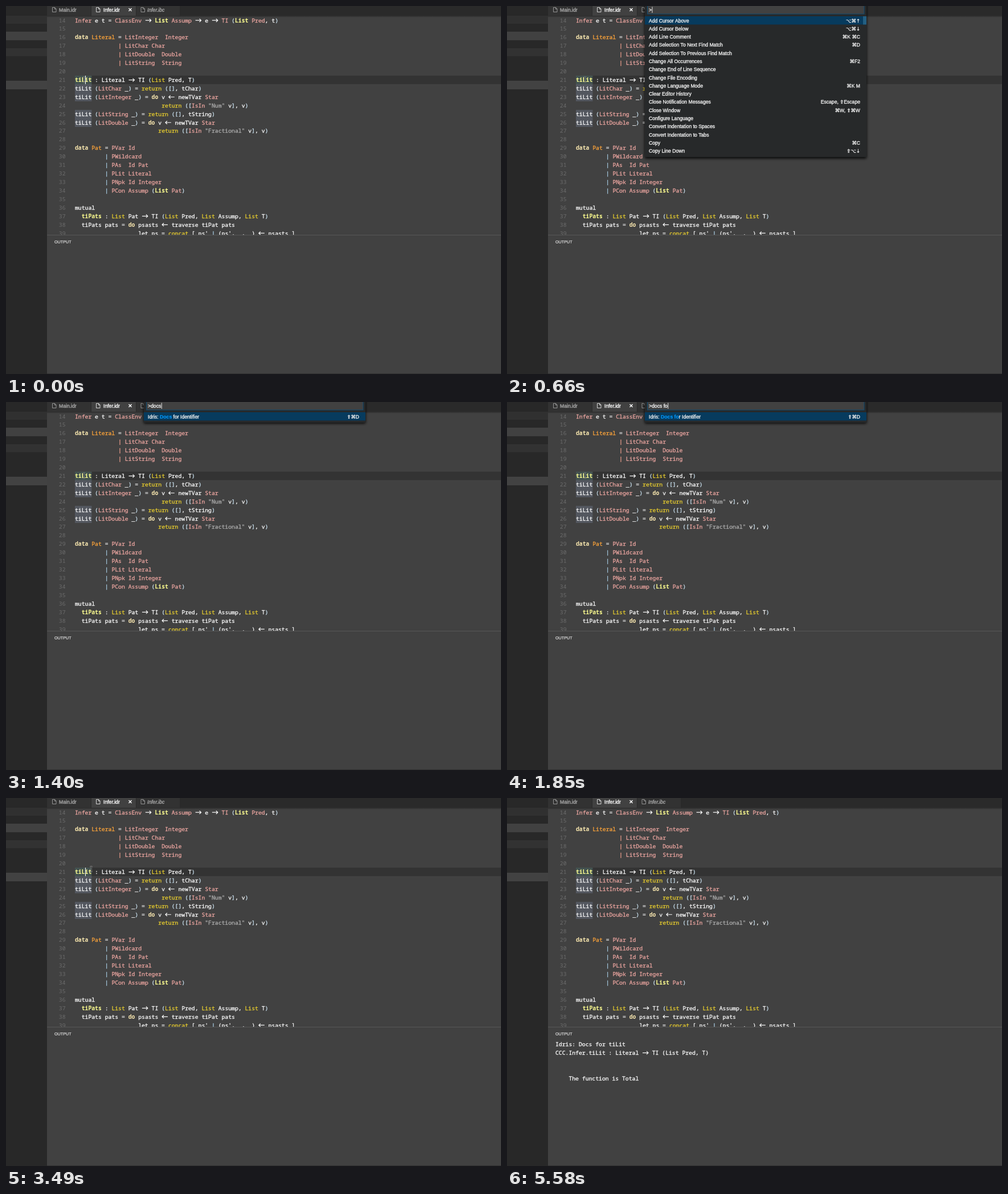
Write an HTML page with a canvas that moves like this. It is 869x645 px and loops after 5.72 s.

```html
<!DOCTYPE html>
<html lang="en">
<head>
<meta charset="utf-8">
<title>Editor: docs for identifier</title>
<style>
html, body { margin: 0; width: 100%; height: 100%; overflow: hidden; background: #414141; }
canvas { display: block; }
</style>
</head>
<body>
<canvas id="stage" width="869" height="645"></canvas>
<script>
const ctx = document.getElementById('stage').getContext('2d');
const LOOP = 5720;
const CELL = 5.853, LINE = 14.92, ROW = 14.28;
const MONO = '9.755px "Noto Sans Mono", "DejaVu Sans Mono", monospace';
const SANS = '"Liberation Sans", "DejaVu Sans", Arial, sans-serif';
const UI = '8.63px ' + SANS;
const SYMBOL = '8.4px "DejaVu Sans", sans-serif';

// "~x" switches to colour x
const INK = {
  w: '#f6f6f6', p: '#e6a29d', b: '#c6dcea', y: '#e3c92f',
  Y: '#ffff90', k: '#fbe9b0', o: '#f7a13a', s: '#a9a9a9', c: '#b0d6ee', r: '#f0a08c'
};
const BOLD = 'Yk';

const CODE = [
  '~pInfer ~we t = ~pClassEnv~w -> ~YList~p Assump~w -> e -> ~pTI ~b(~YList~p Pred~w, t~b)',
  '',
  '~kdata~o Literal~w = ~pLitInteger  Integer',
  '             ~r| ~pLitChar Char',
  '             ~r| ~pLitDouble  Double',
  '             ~r| ~pLitString  String',
  '',
  '~YtiLit~w : Literal -> TI ~b(~yList~w Pred, T~b)',
  'tiLit ~b(~pLitChar ~w_~b)~w = ~yreturn ~b([]~w, tChar~b)',
  'tiLit ~b(~pLitInteger ~w_~b)~w = ~kdo~w v <- newTVar ~pStar',
  '                          ~yreturn ~b([~pIsIn ~s"Num"~w v~b]~w, v~b)',
  'tiLit ~b(~pLitString ~w_~b)~w = ~yreturn ~b([]~w, tString~b)',
  'tiLit ~b(~pLitDouble ~w_~b)~w = ~kdo~w v <- newTVar ~pStar',
  '                         ~yreturn ~b([~pIsIn ~s"Fractional"~w v~b]~w, v~b)',
  '',
  '~kdata~o Pat~w = ~pPVar Id',
  '         ~c| ~pPWildcard',
  '         ~c| ~pPAs  Id Pat',
  '         ~c| ~pPLit Literal',
  '         ~c| ~pPNpk Id Integer',
  '         ~c| ~pPCon Assump ~b(~YList~p Pat~b)',
  '',
  'mutual',
  '  ~YtiPats~w : ~yList~w Pat -> TI ~b(~yList~w Pred, ~yList~w Assump, ~yList~w T~b)',
  '  tiPats pats = ~kdo~w psasts <- traverse tiPat pats',
  "                   let ps = ~yconcat~w [ ps' ~c|~w (ps', _, _) <- psasts ]"
];

// rows: label|shortcut, "*" toggles the match highlight
const ALL = [
  'Add Cursor Above|⌥⌘↑', 'Add Cursor Below|⌥⌘↓', 'Add Line Comment|⌘K ⌘C',
  'Add Selection To Next Find Match|⌘D', 'Add Selection To Previous Find Match',
  'Change All Occurrences|⌘F2', 'Change End of Line Sequence', 'Change File Encoding',
  'Change Language Mode|⌘K M', 'Clear Editor History',
  'Close Notification Messages|Escape, ⇧Escape', 'Close Window|⌘W, ⇧⌘W',
  'Configure Language', 'Convert Indentation to Spaces', 'Convert Indentation to Tabs',
  'Copy|⌘C', 'Copy Line Down|⇧⌥↓'
];
const MATCHES = [
  'Close Win*do*w|⌘W, ⇧⌘W', 'Copy Line *Do*wn|⇧⌥↓', '*D*ebug: *O*pen launch.json',
  '*D*ebug: Step *O*ut|⇧F11', '*D*ebug: Step *O*ver|F10',
  'Files: Open Active File in New Win*do*w|⌘K O', 'Git: Un*do* Last Commit',
  'Idris: *Do*cs for Identifier|⇧⌘D', 'Mark*do*wn: Open Preview|⇧⌘V',
  'Mark*do*wn: Open Preview to the Side|⌘K V', 'Mark*do*wn: Show Source',
  'Move Line *Do*wn|⌥↓', 'New Win*do*w|⇧⌘N', 'Reload Win*do*w'
];

// [start time, value]
const PALETTE = [
  [0, null],
  [660, { query: '>', rows: ALL }],
  [1250, { query: '>do', rows: MATCHES }],
  [1400, { query: '>docs', rows: ['Idris: *Docs* for Identifier|⇧⌘D'] }],
  [1700, { query: '>docs ', rows: ['Idris: *Docs *for Identifier|⇧⌘D'] }],
  [1850, { query: '>docs fo', rows: ['Idris: *Docs fo*r Identifier|⇧⌘D'] }],
  [2150, null]
];
const OUTPUT = [
  [0, []],
  [2440, ['loading...']],
  [3490, []],
  [3640, ['Idris: Docs for tiLit', 'CCC.Infer.tiLit : Literal -> TI (List Pred, T)', '', '', '    The function is Total']]
];
const MOUSE = [
  [0, [136.5, 129]], [3490, [149.5, 124.5]], [3640, [204.5, 110.5]],
  [3790, [462.5, 161.5]], [3940, [665.5, 293.5]], [4090, [698.5, 335.5]],
  [4240, [785.5, 436]], [4390, null]
];
const BLINKS = [450, 2150, 2590, 3190, 3640, 4090, 4680, 5130, 5580];

const at = (track, t) => track.filter(k => k[0] <= t).pop()[1];

function box(x, y, w, h, color) {
  ctx.fillStyle = color;
  ctx.fillRect(x, y, w, h);
}

// fatten: extra stroke width, imitating heavier font smoothing
function label(str, x, y, color, { font = UI, align = 'left', fatten = 0.35 } = {}) {
  ctx.font = font;
  ctx.textAlign = align;
  ctx.fillStyle = ctx.strokeStyle = color;
  ctx.fillText(str, x, y);
  if (fatten) {
    ctx.lineWidth = fatten;
    ctx.lineJoin = 'round';
    ctx.strokeText(str, x, y);
  }
}

function stroke(color, width, ...lines) {
  ctx.strokeStyle = color;
  ctx.lineWidth = width;
  ctx.beginPath();
  for (const pts of lines) pts.forEach(([x, y], i) => i ? ctx.lineTo(x, y) : ctx.moveTo(x, y));
  ctx.stroke();
}

function arrow(x, y, dir, color) {
  const mid = x + CELL, tip = mid + dir * 5, cy = y - 3.3;
  stroke(color, 1.2,
    [[mid - dir * 5, cy], [tip, cy]],
    [[tip - dir * 3, cy - 2.8], [tip, cy], [tip - dir * 3, cy + 2.8]]);
}

function monoLine(src, x, y) {
  let ink = 'w', col = 0;
  for (const part of src.split(/(~\w|->|<-)/)) {
    if (part[0] === '~') { ink = part[1]; continue; }
    const px = x + col * CELL, bold = BOLD.includes(ink);
    if (part === '->' || part === '<-') arrow(px, y, part === '->' ? 1 : -1, INK[ink]);
    else if (part.trim()) {
      label(part, px, y, INK[ink], { font: (bold ? '700 ' : '500 ') + MONO, fatten: bold ? 0 : 0.35 });
    }
    col += part.length;
  }
}

function fileIcon(x, color) {
  stroke(color, 0.9,
    [[x, 2.5], [x + 4, 2.5], [x + 6.5, 5], [x + 6.5, 10.5], [x, 10.5], [x, 2.5]],
    [[x + 3.8, 2.5], [x + 3.8, 5.2], [x + 6.5, 5.2]]);
}

function drawFrame() {
  box(0, 0, 869, 645, '#414141');
  box(0, 0, 72, 645, '#282828');
  box(0, 17, 72, 14, '#303030');
  box(0, 45, 72, 15, '#414141');
  box(0, 74, 72, 14, '#323232');
  box(0, 131, 72, 15, '#424242');
}

function drawTabs() {
  box(72, 0, 797, 17, '#2a2a2a');
  box(72, 0, 77, 17, '#323232');
  box(150, 0, 78, 17, '#414141');
  box(229, 0, 76, 17, '#323232');
  const shade = ctx.createLinearGradient(0, 16, 0, 20);
  shade.addColorStop(0, 'rgba(0,0,0,0.45)');
  shade.addColorStop(1, 'rgba(0,0,0,0)');
  box(72, 17, 797, 3, shade);
  fileIcon(81.5, '#a0a0a0');
  label('Main.idr', 93, 9.5, '#a8a8a8');
  fileIcon(158.5, '#e8e8e8');
  label('Infer.idr', 171, 9.5, '#ffffff');
  stroke('#ffffff', 1.4, [[215.5, 4], [220.5, 9]], [[220.5, 4], [215.5, 9]]);
  fileIcon(237, '#a0a0a0');
  label('Infer.ibc', 248, 9.5, '#a8a8a8', { font: 'italic ' + UI });
}

function drawCode(caret) {
  ctx.save();
  ctx.beginPath();
  ctx.rect(72, 17, 797, 384);
  ctx.clip();
  box(121, 122, 748, 15, '#333333');
  for (const n of [21, 22, 23, 25, 26]) {
    box(121, Math.round(122.2 + (n - 21) * LINE), 29.5, 15, n === 21 ? '#435250' : '#53575f');
  }
  CODE.forEach((src, i) => {
    const y = 28.5 + i * LINE;
    label(14 + i, 104.5, y, '#6c6c6c', { font: MONO, align: 'right', fatten: 0 });
    monoLine(src, 121, y);
  });
  if (caret) box(139, 122, 1, 15, '#ffffff');
  ctx.restore();
}

function drawOutput(lines) {
  box(72, 401, 797, 1, '#575757');
  label('OUTPUT', 85, 416, '#e4e4e4', { font: '7.2px ' + SANS, fatten: 0.2 });
  lines.forEach((src, i) => monoLine(src, 85, 435 + i * LINE));
  box(72, 644, 797, 1, '#303030');
}

function shortcut(keys, right, y) {
  let x = right;
  for (const run of keys.split(/([⌥⌘⇧↑↓])/).reverse()) {
    if (!run) continue;
    label(run, x, y, '#f0f0f0', { font: /[⌥⌘⇧↑↓]/.test(run) ? SYMBOL : UI, align: 'right' });
    x -= ctx.measureText(run).width;
  }
}

function paletteRow(row, i) {
  const [text, keys] = row.split('|');
  const y = 28.6 + i * ROW;
  let x = 249;
  text.split('*').forEach((part, j) => {
    if (j % 2) label(part, x, y, '#0097fb', { font: 'bold ' + UI, fatten: 0.15 });
    else label(part, x, y, '#f0f0f0');
    x += ctx.measureText(part).width;
  });
  if (keys) shortcut(keys, 620, y);
}

function drawPalette({ query, rows }, thumb) {
  ctx.save();
  ctx.shadowColor = '#000000';
  ctx.shadowBlur = 5;
  ctx.shadowOffsetY = 2;
  box(242, -10, 389, 32 + rows.length * ROW, '#27292a');
  ctx.restore();
  box(246, -2, 381.5, 16.5, '#0e4d74');
  box(247, -2, 379.5, 15.5, '#414141');
  label(query, 249, 10, '#f0f0f0');
  box(249 + ctx.measureText(query).width + 0.5, 1.5, 0.9, 10.5, '#f0f0f0');
  box(242, 18, 389, 14.5, '#073b5e');
  if (thumb) box(625, 18, 6, 14.5, '#235f82');
  rows.forEach(paletteRow);
}

function drawMouse([x, y]) {
  const beam = [
    [[x - 2, y - 5], [x, y - 4], [x + 2, y - 5]],
    [[x, y - 4], [x, y + 4]],
    [[x - 2, y + 5], [x, y + 4], [x + 2, y + 5]]
  ];
  stroke('rgba(255,255,255,0.5)', 1.8, ...beam);
  stroke('#202020', 0.8, ...beam);
}

function render(t) {
  const palette = at(PALETTE, t), mouse = at(MOUSE, t);
  const caret = BLINKS.filter(b => b <= t).length % 2 === 0;
  drawFrame();
  drawTabs();
  drawCode(caret);
  drawOutput(at(OUTPUT, t));
  if (palette) drawPalette(palette, t < 800);
  if (mouse) drawMouse(mouse);
}

const start = performance.now();
function tick() {
  render((performance.now() - start) % LOOP);
  requestAnimationFrame(tick);
}
tick();
</script>
</body>
</html>
```
